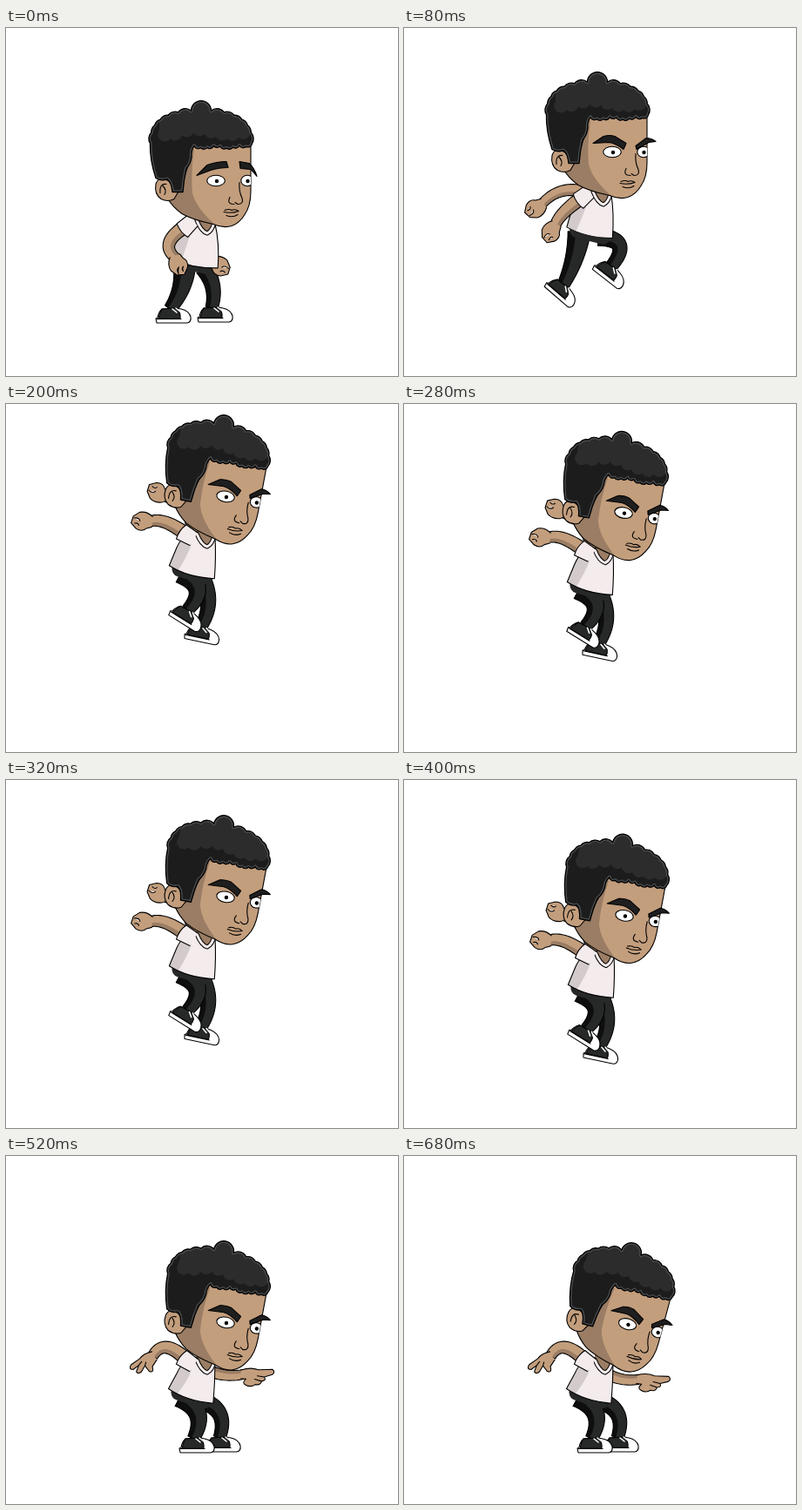
These frames come from a looping animation (450 by 400 pixels, 720 ms). An HTML page with a canvas:

```html
<!DOCTYPE html>
<html lang="en">
<head>
<meta charset="utf-8">
<title>Jump</title>
<style>
html, body { margin: 0; width: 100%; height: 100%; overflow: hidden; background: #fff; }
canvas { display: block; }
</style>
</head>
<body>
<canvas id="stage" width="450" height="400"></canvas>
<script>
const ctx = document.getElementById('stage').getContext('2d');
const SKIN = '#c39e7d', SHADE = '#9a7d64', SHIRT = '#f3ebec', SHIRT_SHADE = '#d3cbcb';
const CLOTH = '#272828', DARK = '#0e0e0e', INK = '#000';
const rad = degrees => degrees * Math.PI / 180;

// root: collar point; body: torso lean and head tilt; arms: upper and lower angle;
// legs: ankle relative to the root, foot angle and how far the knee bends forward.
const crouch = { root: [231, 237], body: [23, 0], nearArm: [138, 70], farArm: [92, 32],
  nearLeg: [-43, 86, 0, 5], farLeg: [5, 85, 0, 6] };
const leap = { root: [229, 204], body: [27, 0], nearArm: [142, 124], farArm: [185, 147],
  nearLeg: [-46, 91, 41, 3], farLeg: [9, 70, 38, 18] };
const air = { root: [231, 165], body: [32, 10.5], nearArm: [212, 184], farArm: [252, 212],
  nearLeg: [-23, 72, 32, 15], farLeg: [-8, 92, 12, 9] };
const land = { root: [231, 250], body: [36, 10.5], nearArm: [215, 150], farArm: [27, 2],
  nearLeg: [-16, 75, 0, 13], farLeg: [14, 74, 0, 13] };
const settle = { ...land, body: [36, 15], farArm: [35, 6] };
const airAt = (x, y) => ({ ...air, root: [x, y] });

const keys = [
  [0, crouch], [80, leap], [160, airAt(231, 160)], [200, air], [320, airAt(231, 193)],
  [400, airAt(232, 214.5)], [520, land], [680, settle], [720, settle]
];

function poseAt(t) {
  const i = keys.findIndex(key => key[0] > t);
  const [t0, a] = keys[i - 1], [t1, b] = keys[i], k = (t - t0) / (t1 - t0), pose = {};
  for (const part in a) pose[part] = a[part].map((v, j) => v + (b[part][j] - v) * k);
  return pose;
}

function paint(path, fill, stroke = INK, width = 1.1) {
  path = typeof path === 'string' ? new Path2D(path) : path;
  if (fill) { ctx.fillStyle = fill; ctx.fill(path); }
  if (stroke) { ctx.strokeStyle = stroke; ctx.lineWidth = width; ctx.stroke(path); }
}

function placed(x, y, degrees, drawing) {
  ctx.save();
  ctx.translate(x, y);
  ctx.rotate(rad(degrees));
  drawing();
  ctx.restore();
}

function clipped(path, drawing) {
  ctx.save();
  ctx.clip(path);
  drawing();
  ctx.restore();
}

const step = ([x, y], angle, length) =>
  [x + length * Math.cos(rad(angle)), y + length * Math.sin(rad(angle))];

// Tapered strip between two offsets (-1..1) across a curve through three joints.
function strip([a, b, c], w0, w1, from, to) {
  const curve = u => a.map((v, i) =>
    v * (1 - u) * (1 - 2 * u) + b[i] * 4 * u * (1 - u) + c[i] * u * (2 * u - 1));
  const left = [], right = [];
  for (let u = 0; u <= 1; u += 1 / 24) {
    const [x, y] = curve(u), [xa, ya] = curve(u - .01), [xb, yb] = curve(u + .01);
    const r = (w0 + (w1 - w0) * u) / 2 / Math.hypot(xb - xa, yb - ya);
    const nx = (ya - yb) * r, ny = (xb - xa) * r;
    left.push([x + nx * from, y + ny * from]);
    right.unshift([x + nx * to, y + ny * to]);
  }
  return new Path2D('M' + left.concat(right).join('L') + 'Z');
}

function limb(joints, w0, w1, fill, shade, side) {
  const whole = strip(joints, w0, w1, -1, 1);
  paint(whole, fill, null);
  paint(strip(joints, w0, w1, side, side * .3), shade, null);
  paint(whole);
}

function shoe() {
  paint('M-9 0Q-13 4-14 10L-16 11L-15 16H20Q25 15 24 9Q22 2 13 0L8-1Z', '#fff');
  paint('M-9 0Q-12 5-13 11H12Q13 4 8-1Z', CLOTH);
  paint('M3 0L8 4M7-1L12 3', null, '#fff', 1.5);
  paint('M-15 11.5H13');
}

function leg(hip, ankle, footAngle, bend, width) {
  const dx = ankle[0] - hip[0], dy = ankle[1] - hip[1], d = Math.hypot(dx, dy);
  const knee = [hip[0] + dx / 2 + dy / d * bend, hip[1] + dy / 2 - dx / d * bend];
  limb([hip, knee, ankle], width, 14, CLOTH, DARK, 1);
  placed(...ankle, footAngle, shoe);
}

const hands = {
  fist: 'M-3-6Q4-12 12-10L19-5L21 3L15 9Q8 13 3 8L-3 6M18-3Q12-4 11 0M17 3Q13 2 12 5',
  spread: 'M-2-5Q8-8 14-5L26-4Q32-1 27 2L19 1L25 6Q25 10 20 9L13 5L12 13Q8 18 6 10L-2 6M19 1L14-1M13 5L10 2',
  point: 'M-2-5Q9-9 18-6L34-7Q38-4 34-1L25 2Q28 6 22 7Q21 12 15 11Q10 15 4 12Q-1 10 4 5L-2 5M25 2L17 1M22 7L14 5'
};

function arm(shoulder, [upper, lower], l0, l1, w0, w1, hand, flip) {
  const elbow = step(shoulder, upper, l0), wrist = step(elbow, lower, l1);
  limb([shoulder, elbow, wrist], w0, w1, SKIN, SHADE, -1);
  placed(...wrist, lower, () => {
    ctx.scale(1, flip);
    paint(hands[hand], SKIN);
  });
}

// Drawn around the collar point; hem holds its left end, middle and right end.
function shirt([left, middle, right]) {
  const body = new Path2D(`M-21-20Q-31-9-35 0L${left}Q${middle} ${right}Q${right[0] + 2} 10 9-12Z`);
  paint(body, SHIRT, null);
  clipped(body, () => paint(`M-40-20L-50 0L${left}l10 6Q-22 8-18-4Z`, SHIRT_SHADE, null));
  paint(body);
  const neckline = '-12-16Q-7-3 0-1Q6-4 8-14';
  paint(`M-12-28L${neckline}V-28Z`, SHADE, null);
  paint('M' + neckline, null, INK, 5);
  paint('M' + neckline, null, SHIRT, 3);
}

// Chain of round bumps through count points given by a function of 0..1.
function bumps(count, radius, sweep, point) {
  let path = '';
  for (let i = 1; i <= count; i++) path += `A${radius} ${radius} 0 0 ${sweep} ${point(i / count)}`;
  return path;
}

const dome = u => {
  const c = -Math.cos(Math.PI * u), s = Math.sin(Math.PI * u);
  return [224 + 58.5 * Math.sign(c) * Math.abs(c) ** .77, 133 - 37.5 * Math.abs(s) ** .77];
};
const hair = new Path2D('M172 173Q165 152 165.5 133' + bumps(13, 10, 1, dome) +
  bumps(9, 4.8, 1, u => [283 - 67 * u, 137 + 1.5 * Math.cos(15 * u)]) +
  'Q212 142 213 148Q212 157 207 162Q204 175 203 189H191Q190 178 185 174Q178 177 172 173Z');
const hairLight = 'M176 118' +
  bumps(8, 8, 0, u => [176 + 104 * u, 126 + 4 * Math.cos(8 * u) - 3 * u]) + 'V80H176Z';
const face = new Path2D('M185 196Q192 207 202 214Q214 221 238 226Q250 231 259 228Q268 225 274 215Q281 205 281 188V130H212V150L200 185Z');
const brows = {
  calm: 'M219 170L231 158Q242 154 253 154L255 161Q244 161 235 164ZM268 154L279 156Q285 161 288 171L281 163L269 162Z',
  angry: 'M219 166L231 158Q238 156 244 158L257 166L254 173Q245 166 237 165ZM268 169L280 160Q286 160 291 164L283 165L269 173Z'
};

function eye(x, rx, pupil) {
  const white = new Path2D(), dot = new Path2D();
  white.ellipse(x, 176, rx, 6.2, 0, 0, 7);
  dot.arc(pupil, 176.5, 2.2, 0, 7);
  paint(white, '#fff');
  paint(dot, INK, null);
}

function head(mood) {
  ctx.translate(-231, -237.5);
  paint(face, SKIN, null);
  clipped(face, () => paint('M180 140H216Q212 165 214 190Q218 208 243 229H180Z', SHADE, null));
  paint(face);
  paint('M186 176Q175 170 172 180Q170 191 178 197Q186 201 193 197L200 185Z', SKIN);
  paint('M177 190Q176 179 184 180M180 182Q185 187 182 192');
  eye(241, 10.3, 242);
  clipped(face, () => eye(277, 7.2, 277.5));
  paint(brows[mood], '#1f1f1f');
  paint('M268 178Q267 188 271 196Q273 203 266 203L263 201M257 195Q253 203 262 203');
  paint('M251 210Q256 208 259 210Q263 208 267 211M250 212Q259 214 267 211M253 216Q260 219 266 215');
  paint(hair, '#1c1c1c', null);
  clipped(hair, () => {
    paint(hairLight, '#2c2c2c', null);
    paint(hair, null, '#4c4e4f', 4);
  });
  paint(hair, null, INK, 1.4);
}

function draw(time) {
  const now = time % 720, tick = now < 520 ? 40 : 80;
  const t = 520 + Math.floor((now - 520) / tick) * tick;
  const { root, body: [lean, tilt], nearArm, farArm, nearLeg, farLeg } = poseAt(t);
  const at = (x, y) => [root[0] + x, root[1] + y];
  const open = t >= 480;
  const waist = step([0, 0], 90 + lean, 44 - lean / 3);
  const hem = [step(waist, lean / 2, -27), [waist[0] - 5, waist[1] + 6], step(waist, lean / 2, 27)];

  ctx.clearRect(0, 0, 450, 400);
  ctx.lineJoin = ctx.lineCap = 'round';
  leg(at(waist[0] + 10, waist[1] + 5), at(farLeg[0], farLeg[1]), farLeg[2], farLeg[3], 20);
  leg(at(waist[0] - 12, waist[1]), at(nearLeg[0], nearLeg[1]), nearLeg[2], nearLeg[3], 26);
  placed(...root, 0, () => paint(`M${step(waist, lean / 2, -14)}L${step(waist, lean / 2, 16)}`, null, CLOTH, 19));
  arm(at(-16, -14), farArm, 31, 29, 14, 11, open ? 'point' : 'fist', 1);
  placed(...root, 0, () => shirt(hem));
  arm(at(-20, -12), nearArm, 31, 20, 16, 12, open ? 'spread' : 'fist', -1);
  placed(...at(-20, -12), nearArm[0], () => paint('M-5-8L12-10Q15 0 11 10L-5 9', SHIRT));
  placed(...root, tilt, () => head(t ? 'angry' : 'calm'));
}

function loop() {
  draw(performance.now());
  requestAnimationFrame(loop);
}
loop();
</script>
</body>
</html>
```
